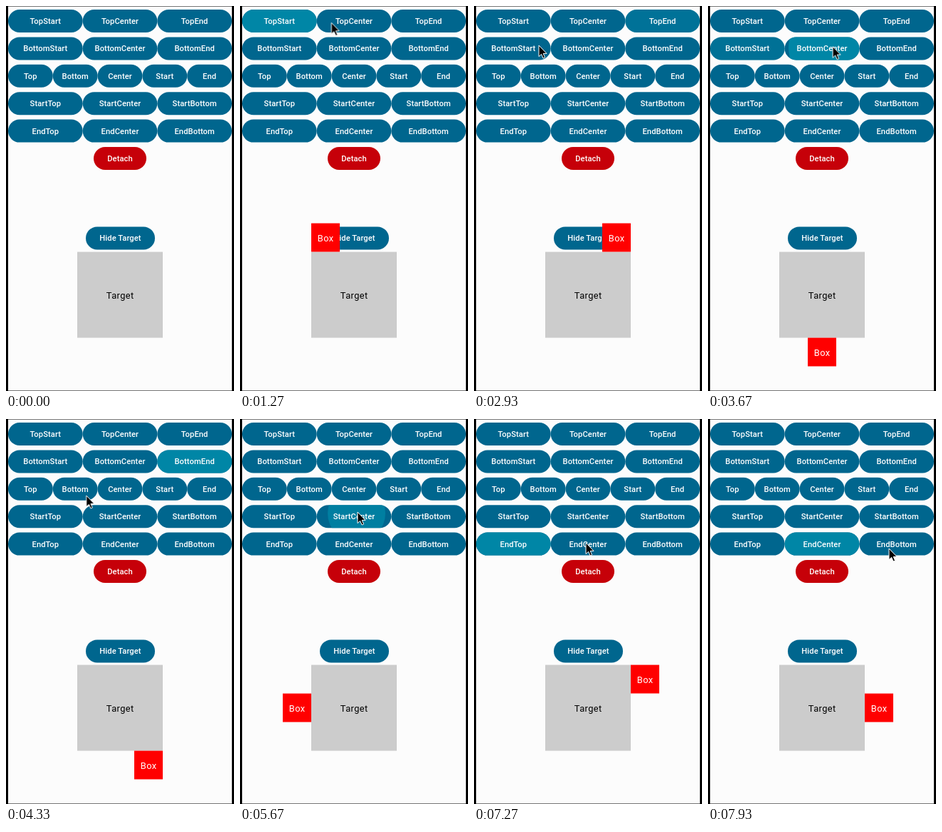
Animation of 320x538 px, one loop 8000 ms. Source, as an HTML page:

```html
<!DOCTYPE html>
<html lang="en">
<head>
<meta charset="utf-8">
<title>Anchored box</title>
<style>
  html, body { margin: 0; width: 100%; height: 100%; overflow: hidden; background: #000; }
  #stage { position: absolute; left: 0; top: 0; }
  text { font: 400 12.8px Roboto, sans-serif; letter-spacing: .4px; text-anchor: middle; }
  .label { font-weight: 500; font-size: 11.2px; letter-spacing: .08px; fill: #fff; }
  .ripple { fill: #0086a6; opacity: 0; }
  #box, #cursor { opacity: 0; }
</style>
</head>
<body>
<svg id="stage" width="320" height="538" viewBox="0 0 320 538">
  <rect x="3" width="314" height="538" fill="#777"/>
  <rect x="3" y="1" width="314" height="536" fill="#fcfcfc"/>
  <g id="buttons"></g>
  <rect x="100" y="343.6" width="120" height="120" fill="#ccc"/>
  <text x="160.2" y="408.6">Target</text>
  <g id="box">
    <rect width="40" height="40" fill="#f00"/>
    <text x="20.2" y="25" fill="#fff">Box</text>
  </g>
  <path id="cursor" d="M0 0V15.6L3.6 12.3 6.1 18 8.6 16.9 6.2 11.4H11Z" stroke="#fff"/>
</svg>
<script>
const LOOP = 8000;
const find = id => document.getElementById(id);
const stage = find('stage');
const buttons = {};

function add(parent, tag, attrs, text = '') {
  const el = document.createElementNS(stage.namespaceURI, tag);
  for (const name in attrs) el.setAttribute(name, attrs[name]);
  el.textContent = text;
  return parent.appendChild(el);
}

function addButton(label, x, y, width, fill = '#00668e') {
  const group = add(find('buttons'), 'g', {});
  const shape = { x, y, width, height: 32, rx: 16 };
  add(group, 'rect', { ...shape, fill });
  const ripple = add(group, 'rect', { ...shape, class: 'ripple' });
  add(group, 'text', { x: x + width / 2, y: y + 20, class: 'label' }, label);
  buttons[label] = { ripple, x, y, width };
}

const thirds = ['Start', 'Center', 'End'];
const sides = ['Top', 'Center', 'Bottom'];
const rows = [
  thirds.map(s => 'Top' + s),
  thirds.map(s => 'Bottom' + s),
  ['Top', 'Bottom', 'Center', 'Start', 'End'],
  sides.map(s => 'Start' + s),
  sides.map(s => 'End' + s)
];
rows.forEach((labels, r) => {
  const width = 314 / labels.length;
  labels.forEach((label, c) => addButton(label, 3 + c * width, 5 + r * 38.4, width));
});
addButton('Detach', 123, 197, 74, '#c60009');
addButton('Hide Target', 112, 308.4, 97);

// Every track spans the whole loop; steps are [time, properties].
function play(el, steps) {
  const frames = steps
    .filter(([t]) => t <= LOOP)
    .map(([t, props]) => ({ offset: t / LOOP, ...props }));
  el.animate(frames, { duration: LOOP, iterations: Infinity });
}

const move = (x, y) => `translate(${x}px, ${y}px)`;
const mix = (a, b, k) => a + (b - a) * k;
const jump = { easing: 'step-end' };

// Each row is pressed from left to right at an even pace.
const runs = [
  { row: 0, start: 1070, gap: 630, from: [70, 24], to: [253, 22] },
  { row: 1, start: 3050, gap: 530, from: [91, 55], to: [250, 58] },
  { row: 3, start: 4960, gap: 650, from: [65, 124], to: [265, 136] },
  { row: 4, start: 6910, gap: 660, from: [60, 165], to: [254, 181] }
];
const presses = runs.flatMap(({ row, start, gap, from, to }) =>
  rows[row].map((label, i) => ({
    label, i, row,
    time: start + i * gap,
    x: mix(from[0], to[0], i / 2),
    y: mix(from[1], to[1], i / 2)
  })));

function boxPlace({ row, i }) {
  const step = 40 * i;
  return row < 2
    ? move(100 + step, row ? 463.6 : 303.6)
    : move(row === 3 ? 60 : 220, 343.6 + step);
}

// The ripple grows from the pointer and settles on the middle of the button.
function addRipple({ label, time, x, y }) {
  const b = buttons[label];
  const small = `circle(${0.3 * b.width}px at ${x - b.x}px ${y - b.y}px)`;
  const full = `circle(${Math.hypot(b.width, 32) / 2 + 8}px at ${b.width / 2}px 16px)`;
  play(b.ripple, [
    [0, { clipPath: small }],
    [time, { clipPath: small, easing: 'cubic-bezier(.4, 0, .2, 1)' }],
    [time + 225, { clipPath: full }],
    [LOOP, { clipPath: full }]
  ]);
  play(b.ripple, [
    [0, { opacity: 0 }],
    [time, { opacity: 0 }],
    [time + 75, { opacity: 1 }],
    [time + 430, { opacity: 1 }],
    [time + 720, { opacity: 0 }],
    [LOOP, { opacity: 0 }]
  ]);
}

const clicks = presses.filter(p => p.time + 720 < LOOP + 300);
clicks.filter(p => p !== presses.at(-1)).forEach(addRipple);

play(find('box'), [
  [0, { opacity: 0, ...jump }],
  ...presses.map(p => [p.time + 50, { opacity: 1, transform: boxPlace(p), ...jump }]),
  [LOOP, { opacity: 1, transform: boxPlace(presses.at(-2)) }]
]);

// The pointer leaves soon after a press and waits on the next button.
const TRAVEL = 190, HOLD = 80;
const stops = presses.flatMap((p, i) => {
  const at = { opacity: 1, transform: move(p.x, p.y) };
  const arrive = i ? presses[i - 1].time + HOLD + TRAVEL : 870;
  return [[arrive, at], [Math.min(p.time + HOLD, LOOP), at]];
});
const entry = move(296, 308);
play(find('cursor'), [
  [0, { opacity: 0, transform: entry, ...jump }],
  [70, { opacity: 1, transform: entry, easing: 'ease-in-out' }],
  ...stops
]);
</script>
</body>
</html>
```
